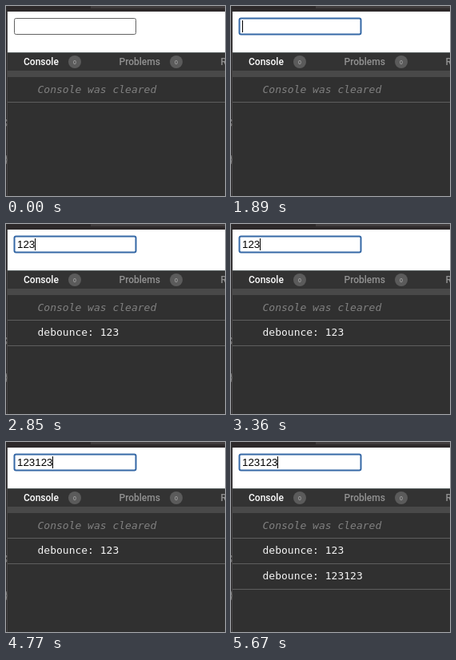
Recreate the animation shown at these times as an HTML page. Size 274 by 238 pixels, loop 6030 ms.

```html
<!DOCTYPE html>
<html lang="en">
<head>
<meta charset="utf-8">
<title>Debounced input</title>
<style>
  html, body { margin: 0; width: 100%; height: 100%; overflow: hidden; background: #303030; }
  svg { display: block; width: 274px; height: 238px; }
  .tab { font: 500 12px Roboto, sans-serif; fill: #929292; }
  .active { fill: #fff; }
  .count { font: 7px Roboto, sans-serif; fill: #b4b4b4; text-anchor: middle; }
  .log { font: 13px "DejaVu Sans Mono", monospace; fill: #f4f4f4; }
  .note { font-style: italic; fill: #808080; }
  .field { font: 13.333px "Liberation Sans", Arial, sans-serif; fill: #000; }
  .rule { fill: #5e5e5e; }
</style>
</head>
<body>
<svg viewBox="0 0 274 238">
  <rect width="274" height="238" fill="#303030"/>
  <!-- window edge -->
  <rect width="274" height="7" fill="#2d292a"/>
  <rect x="106" width="168" height="3" fill="#403c3d"/>
  <rect width="2" height="238" fill="#2c2a2b"/>
  <rect x="1" y="7" width="1" height="231" fill="#484647"/>
  <path d="M0 142q1.4 1 .4 2.500M0 147q1.600 1.500 0 3.500M0 187q1.800 5.500 0 11" fill="none" stroke="#858585"/>

  <!-- page with input -->
  <rect x="2" y="7" width="272" height="51" fill="#fff"/>
  <rect x="10.500" y="15.500" width="152" height="20" rx="2" fill="#fff" stroke="#626262"/>
  <rect id="ring" x="10.500" y="15.500" width="152" height="20" rx="2" fill="none" stroke="#3568a6" stroke-width="2"/>
  <text id="field" class="field" x="14" y="30"></text>
  <rect id="caret" y="18" width="1" height="15" fill="#000"/>

  <!-- console header -->
  <rect x="2" y="58" width="272" height="23" fill="#333"/>
  <rect x="2" y="58" width="272" height="1" fill="#596060"/>
  <rect x="2" y="81" width="272" height="8" fill="#494949"/>
  <text class="tab active" x="22" y="74">Console</text>
  <circle cx="86" cy="70" r="8" fill="#5b5b5b"/>
  <text class="count" x="86" y="72.500">0</text>
  <text class="tab" x="141.500" y="74">Problems</text>
  <circle cx="213" cy="70" r="8" fill="#5b5b5b"/>
  <text class="count" x="213" y="72.500">0</text>
  <text class="tab" x="268.500" y="74">R</text>

  <!-- console output -->
  <text class="log note" x="39.500" y="109">Console was cleared</text>
  <rect class="rule" x="2" y="120" width="272" height="1"/>
  <g id="log1">
    <text class="log" x="39.500" y="140">debounce: 123</text>
    <rect class="rule" x="2" y="152" width="272" height="1"/>
  </g>
  <g id="log2">
    <text class="log" x="39.500" y="172">debounce: 123123</text>
    <rect class="rule" x="2" y="184" width="272" height="1"/>
  </g>
</svg>
<script>
const LOOP = 6030;
const BLINK = 450;
const VALUE = "123123";
const keyTimes = [2040, 2190, 2460, 4380, 4560, 4770];
// The caret blinks anew from each of these moments.
const blinkStarts = [90, 1890, 2460, 4260, 4770];
const digitWidth = 13.333 * 0.5562;

const $ = id => document.getElementById(id);
const ring = $("ring"), field = $("field"), caret = $("caret");
const show = (el, on) => el.setAttribute("visibility", on ? "visible" : "hidden");

function caretOn(t) {
  const start = blinkStarts.filter(s => s <= t).pop();
  return start !== undefined && Math.floor((t - start) / BLINK) % 2 === 0;
}

function draw(t) {
  const typed = keyTimes.filter(k => k <= t).length;
  ring.setAttribute("opacity", t < 30 ? 0 : t < 90 ? 0.35 : t < 180 ? 0.7 : 1);
  field.textContent = VALUE.slice(0, typed);
  caret.setAttribute("x", Math.round(14 + typed * digitWidth - 0.1));
  show(caret, caretOn(t));
  show($("log1"), t >= 2850);
  show($("log2"), t >= 5130);
}

const began = performance.now();
function tick() {
  draw((performance.now() - began) % LOOP);
  requestAnimationFrame(tick);
}
draw(0);
requestAnimationFrame(tick);
</script>
</body>
</html>
```
